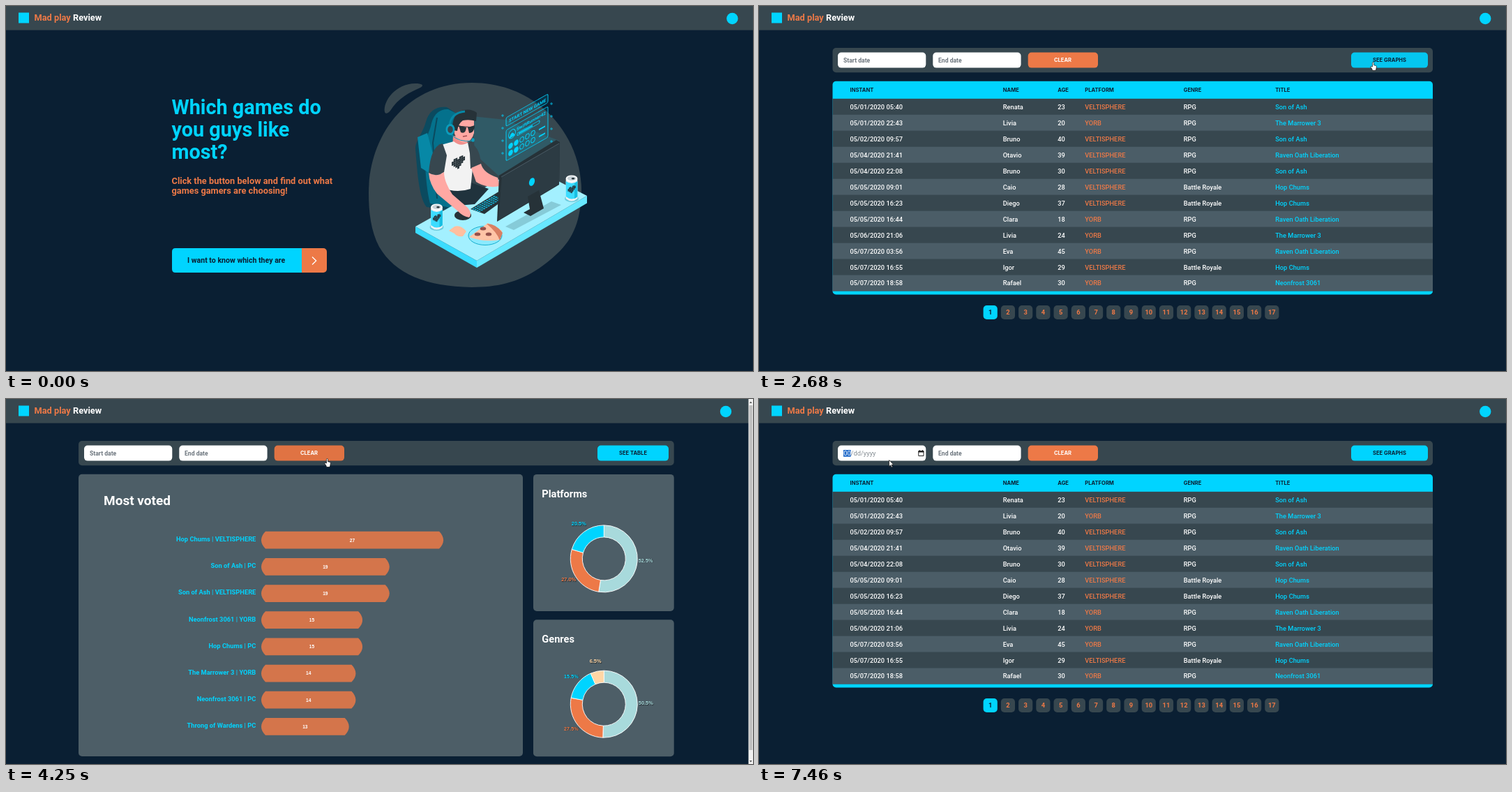
An HTML page for the animation above (8 s loop, 1071 px wide and 523 px high).

```html
<!DOCTYPE html>
<html lang="en">
<head>
<meta charset="utf-8">
<title>Game survey</title>
<style>
html, body { margin: 0; width: 100%; height: 100%; overflow: hidden; background: #0a1f33; }
svg { display: block; width: 100%; height: 100%; font-family: Roboto, "Open Sans", sans-serif; }
text { white-space: pre; }
.b { font-weight: 700; }
.row { font-weight: 500; }
.caps { font: 700 7.6px Inter, Roboto, sans-serif; }
.url { font-family: "Open Sans", sans-serif; }
.count { font: 700 6.6px "Liberation Sans", Arial, sans-serif; }
.pct { font: 700 7.4px "Liberation Sans", Arial, sans-serif; text-shadow: .7px .7px .8px #0009; }
.mid { text-anchor: middle; }
.end { text-anchor: end; }
</style>
</head>
<body>
<svg id="stage" viewBox="0 0 1071 523"></svg>
<script>
const NS = 'http://www.w3.org/2000/svg';
const CYAN = '#00d4ff', ORANGE = '#ed7947', SLATE = '#37474f', NAVY = '#0a1f33', PANEL = '#4d5e67',
  DARK = '#263238', SKIN = '#ffa8a3', CYAN_HOVER = '#05c6ef', ORANGE_HOVER = '#e07343';

function el(parent, tag, attrs = {}, text) {
  const node = document.createElementNS(NS, tag);
  set(node, attrs);
  if (text !== undefined) node.textContent = text;
  return parent.appendChild(node);
}
function set(node, attrs) { for (const k in attrs) node.setAttribute(k, attrs[k]); }
const show = (node, on) => set(node, { display: on ? 'inline' : 'none' });
const clamp = v => Math.max(0, Math.min(1, v));
const group = (parent, attrs) => el(parent, 'g', attrs);
const box = (g, x, y, x2, y2, fill, rx = 0) =>
  el(g, 'rect', { x, y, width: x2 - x, height: y2 - y, rx, fill });
const path = (g, d, fill, more) => el(g, 'path', { d, fill, ...more });
const line = (g, d, stroke, width = 1) =>
  path(g, d, 'none', { stroke, 'stroke-width': width, 'stroke-linejoin': 'round' });
const oval = (g, cx, cy, rx, ry, fill, more) => el(g, 'ellipse', { cx, cy, rx, ry, fill, ...more });
const text = (g, x, y, size, fill, str, cls = 'b') =>
  el(g, 'text', { x, y, 'font-size': size, fill, class: cls }, str);
const caps = (g, x, y, fill, str, cls = '') => text(g, x, y, 7.6, fill, str, 'caps ' + cls);

const stage = document.getElementById('stage');
box(stage, 0, 0, 1071, 523, NAVY);

// Top bar
box(stage, 0, 0, 1071, 34.6, SLATE);
box(stage, 18, 9.5, 33, 24.5, CYAN);
const brand = text(stage, 40.5, 21.2, 12.8, ORANGE, 'Mad play ');
el(brand, 'tspan', { fill: '#fff' }, 'Review');
const badge = oval(stage, 1041.3, 18, 8.2, 8.2, CYAN);

// Home
const home = group(stage);
['Which games do', 'you guys like', 'most?'].forEach((s, i) => text(home, 237.5, 155.3 + 32 * i, 28.8, CYAN, s));
['Click the button below and find out what', 'games gamers are choosing!'].forEach((s, i) =>
  text(home, 237.5, 254.8 + 14.2 * i, 12.8, ORANGE, s));
box(home, 400, 347, 460, 382, ORANGE, 5);
const cta = path(home, 'M243,347H424V382H243Q238,382 238,377V352Q238,347 243,347Z', CYAN);
text(home, 260, 368.4, 10.6, NAVY, 'I want to know which they are');
line(home, 'M439,359.5 444.7,365 439,370.5', '#fff', 1.3);
drawGamer(group(home));

function heart(g, x, y, s) {
  const h = group(g, { transform: `matrix(${s},${-.45 * s},0,${s},${x},${y})` });
  ['0110110', '1111111', '1111111', '0111110', '0011100', '0001000'].forEach((row, j) =>
    [...row].forEach((c, i) => c === '1' && box(h, i, j, i + 1.05, j + 1.05, DARK)));
}
function can(g, x, y) {
  const c = group(g, { transform: `translate(${x},${y})` });
  oval(c, 0, 34, 10, 5, '#6fcbdc');
  path(c, 'M-8.3,5V34Q0,41 8.3,34V5Z', '#eef3f5');
  path(c, 'M-8.3,9Q0,15 8.3,9V31Q0,38 -8.3,31Z', '#3cdcff');
  path(c, 'M4,12Q7,11 8.3,9V31Q7,33 4,34Z', '#18bfe2');
  oval(c, 0, 5, 8.3, 4.6, '#fff');
  oval(c, 0, 5, 6.3, 3.2, '#c9d3d8');
  oval(c, 2, 5.3, 2.3, 1.2, DARK);
  heart(c, -5.5, 19, 1.6);
}
function drawGamer(g) {
  path(g, 'M520,268C520,188 572,110 668,110C766,110 826,190 825,266C824,305 815,332 790,355C750,393 712,403 668,403C602,402 558,384 535,345C523,322 520,295 520,268Z', SLATE);
  path(g, 'M543,152C540,136 560,109 590,111C598,112 599,114 594,117C580,123 562,132 551,150C548,154 544,155 543,152Z', SLATE);
  path(g, 'M669,158 716,163 793,193 706,243 672,212Z', CYAN, { opacity: .13 });
  // chair
  path(g, 'M587,205C587,192 597,184 602,166C606,150 618,143 632,145L643,152 640,205 652,284 640,293 603,288C592,275 590,240 587,205Z', '#0b4a5f');
  path(g, 'M600,206C600,190 608,180 610,168C614,153 624,147 634,148L644,153 640,205 653,284 642,290 608,283C602,260 601,230 600,206Z', '#04718c');
  path(g, 'M590,188 604,182 612,212 608,240 595,232Z', '#0788a6');
  line(g, 'M618,160 612,196 618,276', '#0b4a5f', 2);
  // desk
  path(g, 'M587,316 745,227 833,272 675,365Z', '#a3f0ff');
  path(g, 'M587,316 675,365V375L587,325Z', '#3bdcff');
  path(g, 'M675,365 833,272V282.5L675,375Z', '#68e8ff');
  path(g, 'M716,316 782,280 796,285 728,321Z', '#86cbd8');
  // body
  path(g, 'M626,262 664,252 692,262 672,284 648,286Z', '#20333d');
  path(g, 'M641,186 661,188 662,205 640,204Z', '#f08f8c');
  path(g, 'M624,199 642,194Q652,203 663,195L672,204 666,262Q645,269 625,260L623,225Z', '#f2f2f2');
  path(g, 'M626,197Q609,200 606,239Q616,246 628,238L632,214Z', SLATE);
  path(g, 'M662,195Q679,199 681,226Q674,234 666,233L665,211Z', SLATE);
  heart(g, 639, 221, 2.7);
  path(g, 'M667,232 681,226Q684,239 705,246L708,258Q690,262 674,252Z', SKIN);
  // head
  path(g, 'M643,161Q656,152 671,163L671,182Q668,194 658,196Q647,195 643,183Z', SKIN);
  path(g, 'M640,178Q639,154 656,149Q668,147 675,153L674,165Q664,162 655,164Q648,169 647,179Z', DARK);
  path(g, 'M649,171 660,174Q659,184 652,181ZM662,174 672,171Q671,183 664,182Z', DARK);
  line(g, 'M645,172 672,174', DARK, 1.2);
  line(g, 'M655,187 661,186', '#a34b50', 1.3);
  line(g, 'M636,171Q638,153 658,151', '#0788a6', 3);
  oval(g, 637, 177, 6.5, 8, '#0b9dbd');
  oval(g, 637, 177, 3.8, 5, SLATE);
  oval(g, 669.5, 192, 2.2, 2.8, '#0b9dbd');
  line(g, 'M638,184Q650,196 668,193', '#0b9dbd');
  // keyboard, mouse, near arm
  path(g, 'M666,291 708,265V282L686,298Z', DARK);
  const keys = group(g, { transform: 'matrix(1,-.6,.9,.36,668,291)' });
  for (let i = 0; i < 40; i++) {
    const x = i % 10 * 3.3, y = Math.floor(i / 10) * 3.3;
    box(keys, x, y, x + 2.2, y + 2.2, '#0fb9dc');
  }
  oval(g, 655, 300, 12, 7, DARK);
  path(g, 'M606,239Q617,246 628,238Q628,252 640,270L662,289Q669,298 664,303Q654,301 648,294L618,269Q607,255 606,239Z', SKIN);
  // monitor
  path(g, 'M707,243 789,192 794,195 793,256 704,309Z', DARK);
  path(g, 'M711,244 794,196 793,255 706,307Z', '#2c3b43');
  line(g, 'M710,245 793,197', '#51636c', .8);
  path(g, 'M748,273 764,264 771,290 752,301 742,296 751,291Z', DARK);
  oval(g, 754, 252, 3.8, 6, CYAN, { transform: 'rotate(20 754 252)' });
  can(g, 617.5, 283);
  can(g, 811, 242);
  // snacks
  path(g, 'M635,322Q640,318 643,316Q652,313 660,323L655,330Q646,331 643,326Z', '#ffbf9f');
  oval(g, 687, 329, 24, 13.5, '#8beaff', { stroke: '#16aecd' });
  path(g, 'M664,331 691,311 711,322 707,335Q686,339 664,331Z', '#ffc4a6');
  path(g, 'M689,312Q703,312 712,325L708,336Q704,324 689,312Z', '#d97f62');
  for (let i = 0; i < 3; i++) oval(g, 676 + 8 * i, 327 - 8 * (i % 2), 4.3, 2.5, '#94504a');
  // floating panels
  const holo = group(g, { transform: 'matrix(1,-.567,0,1,717,160)', stroke: CYAN, fill: 'none', 'stroke-width': .9 });
  const label = (x, y, s) => set(text(holo, x, y, 6.3, CYAN, s), { stroke: 'none' });
  box(holo, 0, 0, 60, 12.5, '#00d4ff18', 2);
  box(holo, 0, 18, 60, 62, '#00d4ff18', 2);
  label(4, 9.3, 'START NEW GAME');
  label(15, 27.5, 'SwiftRunner42');
  oval(holo, 8.5, 28, 5, 6, 'none');
  path(holo, 'M5,32Q8.5,22 12,32Z', CYAN);
  box(holo, 16, 31, 48, 35, 'none', 1.5);
  line(holo, 'M18,33H38', CYAN, 2);
  for (let i = 0; i < 10; i++) {
    const x = 6.5 + i % 5 * 8, y = i < 5 ? 44 : 54;
    oval(holo, x, y, 2.8, 3.4, i % 5 < 2 ? CYAN : 'none');
  }
  line(holo, 'M47,44h9M47,54h9', CYAN, 2);
  for (let i = 0; i < 8; i++) {
    const x = i % 2 ? 782 : 712, y = (i % 2 ? 140 : 157) + 18 * Math.floor(i / 2);
    line(g, `M${x - 2},${y}h4m-2,-2v4`, CYAN, .7);
  }
}

// Filter bar
const filter = group(stage);
const filterBox = box(filter, 105.5, 60, 966, 95.3, SLATE, 5);
const fields = group(filter);
const control = (g, x, x2, fill) => box(g, x, 66.6, x2, 88.6, fill, 5);
control(fields, 113, 239.3, '#fff');
control(fields, 249.3, 375.6, '#fff');
const startHint = text(fields, 121, 80.5, 8.6, '#6c757d', 'Start date');
text(fields, 257, 80.5, 8.6, '#6c757d', 'End date');
const clear = control(fields, 385.7, 486, ORANGE);
caps(fields, 435.5, 80.3, '#fff', 'CLEAR', 'mid');
const swap = control(filter, 849, 959, CYAN);
const swapText = caps(filter, 904, 80.3, NAVY, '', 'mid');

const date = group(fields);
const monthBox = box(date, 121, 73, 132, 82.7, '#1a66c8');
const month = text(date, 121.2, 81, 9.3, '#fff', '', '');
const dayYear = text(date, 132, 81, 9.3, '#868e94', '/dd/yyyy', '');
line(date, 'M228.8,74.5H236V81.5H228.8ZM230.3,73V75M234.5,73V75', '#222');
line(date, 'M228.5,75.5H236.3', '#222', 2);

// Records
const P = ['VELTISPHERE', 'YORB', 'PC'];
const G = { a: 'Son of Ash', m: 'The Marrower 3', r: 'Raven Oath Liberation', h: 'Hop Chums', n: 'Neonfrost 3061', t: 'Throng of Wardens' };
const rows = `01/2020 05:40|Renata|23|0|a
01/2020 22:43|Livia|20|1|m
02/2020 09:57|Bruno|40|0|a
04/2020 21:41|Otavio|39|0|r
04/2020 22:08|Bruno|30|0|a
05/2020 09:01|Caio|28|0|h
05/2020 16:23|Diego|37|0|h
05/2020 16:44|Clara|18|1|r
06/2020 21:06|Livia|24|1|m
07/2020 03:56|Eva|45|1|r
07/2020 16:55|Igor|29|0|h
07/2020 18:58|Rafael|30|1|n`.split('\n').map(s => s.split('|'));
const records = group(stage);
const cols = [130.5, 349.7, 428.3, 467.3, 608.7, 740.2];
box(records, 105.5, 107.7, 966, 413.4, CYAN, 5);
box(records, 105.5, 132.8, 966, 408.4, SLATE);
['INSTANT', 'NAME', 'AGE', 'PLATFORM', 'GENRE', 'TITLE'].forEach((s, i) => caps(records, cols[i], 122.8, NAVY, s));
rows.forEach(([when, name, age, p, game], i) => {
  const y = 132.8 + 22.98 * i;
  if (i % 2) box(records, 105.5, y, 966, y + 22.9, '#4b5d67');
  ['05/' + when, name, age, P[p], game === 'h' ? 'Battle Royale' : 'RPG', G[game]].forEach((s, c) =>
    text(records, cols[c], y + 14.9, 9.3, c === 3 ? ORANGE : c === 5 ? CYAN : '#fff', s, 'row'));
});
for (let i = 0; i < 17; i++) {
  const x = 321.6 + 25.23 * i;
  box(records, x, 429, x + 20.2, 449, i ? SLATE : CYAN, 5);
  text(records, x + 10.1, 442.4, 9.4, i ? ORANGE : NAVY, i + 1, 'b mid');
}

// Graphs
const graphs = group(stage);
box(graphs, 104, 107.7, 741, 512, PANEL, 5);
text(graphs, 140, 152.3, 19, '#fff', 'Most voted');
const bars = ['h0 27', 'a2 19', 'a0 19', 'n1 15', 'h2 15', 'm1 14', 'n2 14', 't2 13'].map((s, i) => {
  const votes = +s.slice(3), w = votes * 9.67, y = 189.8 + 38.17 * i;
  text(graphs, 358.3, y + 14.2, 9.3, CYAN, `${G[s[0]]} | ${P[s[1]]}`, 'b end');
  const bar = path(graphs, `M6,0H${w - 6}C${w + 2},8 ${w + 2},17 ${w - 6},24.8H6C-2,17 -2,8 6,0Z`, ORANGE, { opacity: .85 });
  text(graphs, 366 + w / 2, y + 14.8, 6.6, '#fff', votes, 'count mid');
  return { bar, y };
});
const hues = ['#a8dadc', ORANGE, CYAN, '#ffd6a5'];
function donut(title, top, parts) {
  const cy = top + 121;
  const at = (f, r) => [857.3 + r * Math.sin(f * 2 * Math.PI), cy - r * Math.cos(f * 2 * Math.PI)];
  box(graphs, 756, top, 957.7, top + 196, PANEL, 5);
  text(graphs, 768.3, top + 32.7, 14.6, '#fff', title);
  let sum = 0;
  const slices = parts.map((p, i) => {
    const from = sum / 100, to = (sum += p) / 100;
    const node = path(graphs, '', hues[i], { stroke: '#fff', 'stroke-width': .9 });
    const [x, y] = at((from + to) / 2, 60);
    text(graphs, x, y, 7.4, hues[i], p.toFixed(1) + '%', 'pct mid');
    return { node, from, to };
  });
  return sweep => slices.forEach(({ node, from, to }) => {
    const end = Math.min(to, sweep), big = end - from > .5 ? 1 : 0;
    show(node, end > from);
    set(node, { d: `M${at(from, 48)}A48,48 0 ${big} 1 ${at(end, 48)}L${at(end, 31)}A31,31 0 ${big} 0 ${at(from, 31)}Z` });
  });
}
const donuts = [donut('Platforms', 107.9, [52.5, 27, 20.5]), donut('Genres', 316.2, [50.5, 27.5, 15.5, 6.5])];
box(graphs, 1064.5, 0, 1071, 523, '#f1f1f1');
box(graphs, 1065.5, 9, 1070.3, 503, '#c1c1c1');
path(graphs, 'M1066,6 1067.8,3.5 1069.6,6ZM1066,518 1067.8,520.5 1069.6,518Z', '#505050');

const loader = oval(stage, 535.8, 122.8, 15.3, 15.3, ORANGE);

// Status bubble
const status = group(stage);
path(status, 'M0,513.3H69Q71,513.3 71,515.3V523H0Z', '#dee1e6');
text(status, .8, 520.9, 6.3, '#444a50', 'localhost:3000/records', 'url');

// Pointer shapes
const ink = { stroke: '#111', 'stroke-width': .7, 'stroke-linejoin': 'round' };
const pointers = {
  arrow: path(stage, 'M0,0V9.2L2.1,7.3 3.5,10.4 4.9,9.8 3.5,6.8 6.3,6.6Z', '#fff', ink),
  hand: path(stage, 'M-1,6.5V1A1,1 0 0 1 1,1V4.2L4,5Q5,5.3 4.9,6.4L4.4,9.6 3.5,12H-.8L-1.8,9.6 -3.6,7Q-3.6,5.4 -2,6.2Z', '#fff', ink),
  beam: line(stage, 'M-1.5,-5.5H1.5M0,-5.5V5.5M-1.5,5.5H1.5', '#111', .8)
};

// Timing
const LOOP = 8000, STEP = 79;
const ENTER = 130, LINK = 980, RECORDS = 1210, LEAVE = 1600, BLANK = 2780, GRAPHS = 2940, BACK = 4650, PICK = 5900, TYPE = 7460;
const LOAD = 2 * STEP, GROW = 10 * STEP;

// Pointer moves: start, steps, x, y to reach
const moves = [[ENTER, 3, 896, 404], [510, 5, 313, 367], [LEAVE, 11, 880.5, 80.5], [3810, 4, 600, 474],
  [4110, 1, 354, 84], [4190, 1, 460.5, 85.5], [4355, 3, 885, 80.5], [4970, 9, 189, 87], [PICK, 1, 186.5, 87.5]];
function pointAt(t) {
  let x = 1070, y = 530;
  for (const [start, steps, tx, ty] of moves) {
    if (t < start) break;
    const f = clamp((Math.floor((t - start) / STEP) + 1) / steps), ease = f * f * (3 - 2 * f);
    x += (tx - x) * ease;
    y += (ty - y) * ease;
  }
  return [x, y];
}

function render(t) {
  const atHome = t < RECORDS, onGraphs = t >= GRAPHS && t < BACK;
  const wait = Math.floor((t - (t < BACK ? RECORDS : BACK)) / STEP) * STEP;
  const loading = !atHome && wait < LOAD;
  show(home, atHome);
  show(filter, !atHome);
  show(graphs, onGraphs);
  show(records, !atHome && !onGraphs && !loading && (t < BLANK || t >= BACK));
  show(loader, loading);
  const r = 7 + wait * .105;
  set(loader, { rx: r, ry: r, opacity: .8 - wait * .003 });

  // The page is narrower while the scrollbar is there
  set(badge, { cx: onGraphs ? 1032 : 1041.3 });
  set(filterBox, { x: onGraphs ? 104 : 105.5, width: onGraphs ? 853.7 : 860.5 });
  set(fields, { transform: `translate(${onGraphs ? -1 : 0},0)` });
  const sx = onGraphs ? 848 : 849, sw = onGraphs ? 102 : 110;
  set(swap, { x: sx, width: sw });
  set(swapText, { x: sx + sw / 2 });
  swapText.textContent = t >= BLANK && t < BACK ? 'SEE TABLE' : 'SEE GRAPHS';

  const grow = Math.floor((t - GRAPHS) / STEP) * STEP;
  bars.forEach(({ bar, y }, i) =>
    set(bar, { transform: `translate(366,${y}) scale(${clamp((grow + 40 - 42 * i) / 536)},1)` }));
  donuts.forEach(draw => draw(Math.max(.005, clamp(grow / GROW))));

  const typed = t >= TYPE, width = typed ? 10.7 : 16.5;
  show(startHint, t < PICK);
  show(date, t >= PICK);
  month.textContent = typed ? '00' : 'mm';
  set(monthBox, { width });
  set(dayYear, { x: 121 + width });

  show(status, t >= LINK && t < LEAVE);
  set(status, { opacity: t < LINK + 80 ? .5 : 1 });

  const [x, y] = pointAt(t);
  const over = (x1, x2, y1 = 67, y2 = 88) => x >= x1 && x <= x2 && y >= y1 && y <= y2;
  const onCta = atHome && over(238, 460, 347, 382);
  const onClear = !atHome && over(385, 486), onSwap = !atHome && over(sx, sx + sw);
  const onField = !atHome && (over(113, 239, 67, 87.2) || over(249, 375, 67, 87.2));
  set(cta, { fill: onCta ? CYAN_HOVER : CYAN });
  set(clear, { fill: onClear ? ORANGE_HOVER : ORANGE });
  set(swap, { fill: onSwap ? CYAN_HOVER : CYAN });
  const kind = onCta || onClear || onSwap ? 'hand' : onField ? 'beam' : 'arrow';
  for (const k in pointers) {
    show(pointers[k], t >= ENTER && k === kind);
    set(pointers[k], { transform: `translate(${x},${y})` });
  }
}

const begin = performance.now();
function tick() {
  render((performance.now() - begin) % LOOP);
  requestAnimationFrame(tick);
}
tick();
</script>
</body>
</html>
```
